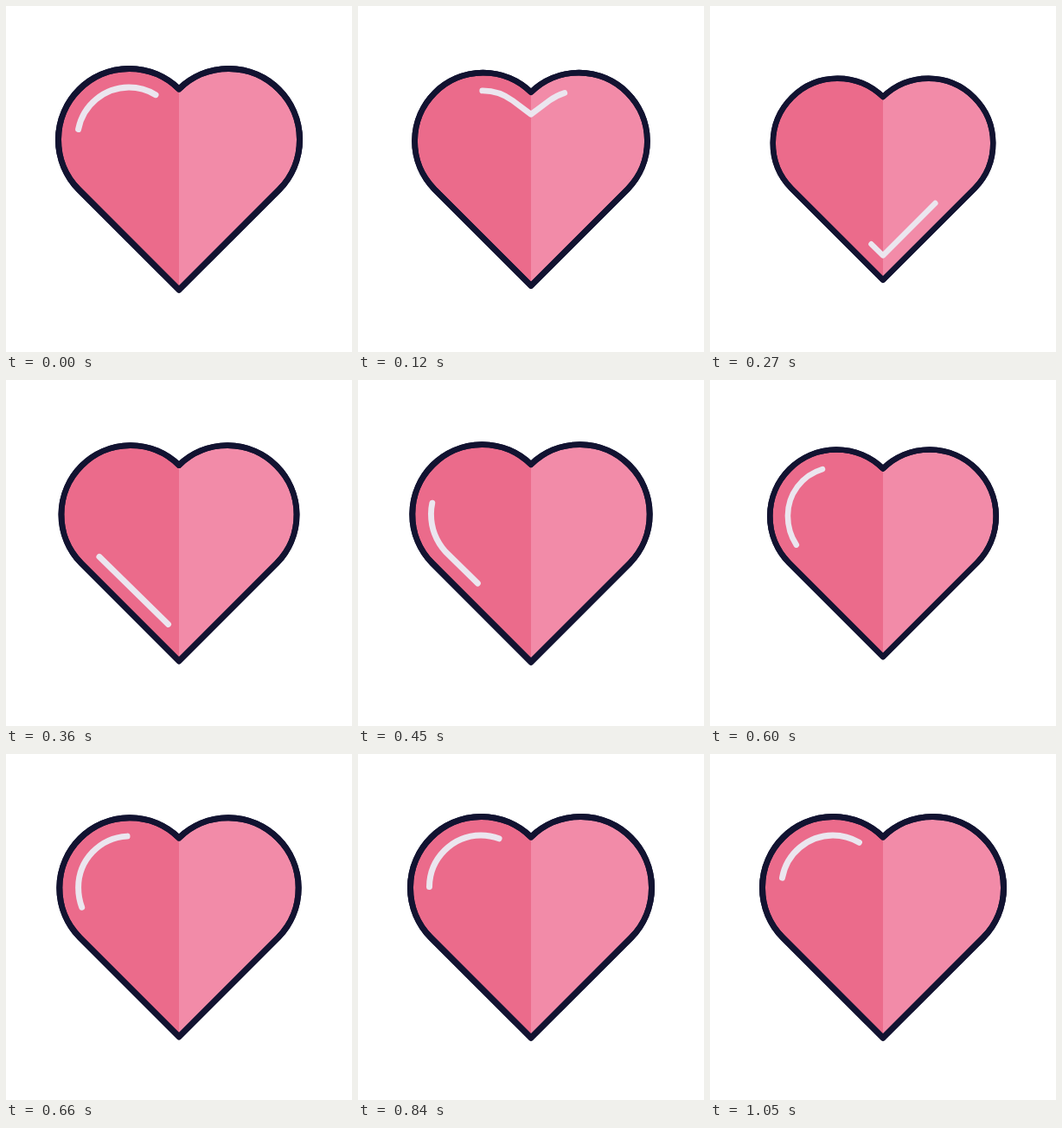
These frames come from a looping animation (400x400 px, 3260 ms). An HTML page:

```html
<!DOCTYPE html>
<html lang="en">
<head>
<meta charset="utf-8">
<title>Beating heart</title>
<style>
  html, body { margin: 0; width: 100%; height: 100%; overflow: hidden; background: #fff; }
  svg { display: block; width: 100%; height: 100%; }
  .line { fill: none; stroke-width: 7; stroke-linecap: round; stroke-linejoin: round; }
</style>
</head>
<body>
<svg viewBox="0 0 400 400">
  <g id="heart">
    <!-- a square standing on its corner, with a half circle on each upper side -->
    <path id="body" fill="#f28ba8" d="M200 95.9A82.1 82.1 0 0 1 316.1 212L200 328.1L83.9 212A82.1 82.1 0 0 1 200 95.9Z"/>
    <path fill="#eb6b8b" d="M200 328.1L83.9 212A82.1 82.1 0 0 1 200 95.9Z"/>
    <use href="#outline"/>
    <path id="outline" class="line" stroke="#121331" d="M200 95.9A82.1 82.1 0 0 1 316.1 212L200 328.1L83.9 212A82.1 82.1 0 0 1 200 95.9Z"/>
    <path id="shine" class="line" stroke="#ebe6ef" pathLength="1" stroke-dasharray=".164 .836"
      d="M200 122.5L222 106A60 60 0 0 1 258 94A60 60 0 0 1 318 154A60 60 0 0 1 300.5 196.4L200 297L99.5 198.5A67 67 0 0 1 82.5 154A60 60 0 0 1 142 94A60 60 0 0 1 178 106Z"/>
  </g>
</svg>
<script>
const LOOP = 3260, STEP = 30;
const FIRST_DIP = 270, HALF_BEAT = 140, DEPTH = 0.088;
const LAP = 1050, ONSET = 105, SOFTNESS = 22, DECAY = 193, SHINE_START = 0.787;
const heart = document.getElementById('heart');
const shine = document.getElementById('shine');

// Two cosine beats: a slow first dip, then three quicker half beats.
function beat(t) {
  const phase = t < FIRST_DIP ? t / FIRST_DIP : 1 + (t - FIRST_DIP) / HALF_BEAT;
  return 1 - DEPTH * (1 - Math.cos(Math.PI * Math.min(phase, 4))) / 2;
}

// Soft start around ONSET, then an exponential glide to rest.
function glide(t) {
  const moved = SOFTNESS * Math.log(1 + Math.exp((t - ONSET) / SOFTNESS));
  return 1 - Math.exp(-moved / DECAY);
}

function draw(now) {
  const t = Math.floor((now % LOOP) / STEP) * STEP;
  const lap = glide(Math.min(t, LAP)) / glide(LAP);
  heart.setAttribute('transform', `translate(200 200) scale(${beat(t)}) translate(-200 -200)`);
  shine.setAttribute('stroke-dashoffset', -((SHINE_START + lap) % 1));
}

const start = performance.now();
function tick() {
  draw(performance.now() - start);
  requestAnimationFrame(tick);
}
tick();
</script>
</body>
</html>
```
